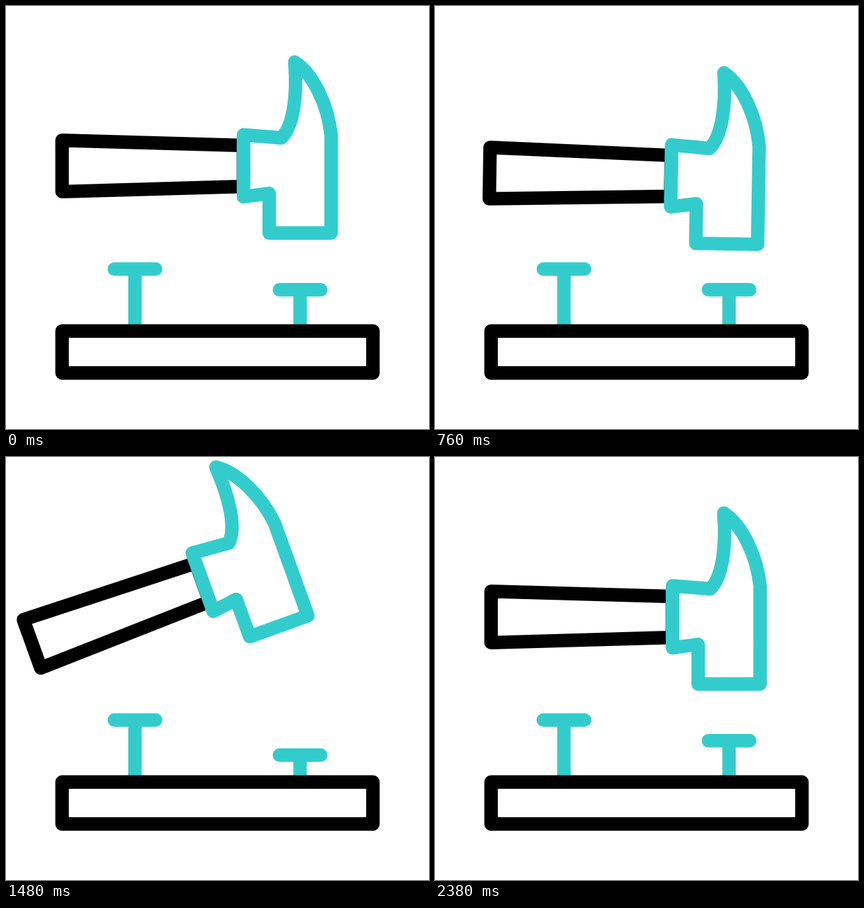
Animation, 640 px wide and 640 px high, one loop 2400 ms. Source, as an HTML page with a canvas:

```html
<!DOCTYPE html>
<html lang="en">
<head>
<meta charset="utf-8">
<title>Hammer and nails</title>
<style>
  html, body { margin: 0; width: 100%; height: 100%; overflow: hidden; background: #fff; }
  canvas { display: block; width: 640px; height: 640px; }
</style>
</head>
<body>
<canvas id="stage" width="640" height="640"></canvas>
<script>
const ctx = document.getElementById('stage').getContext('2d');
const LOOP = 2400;
const STEP = 20;
const TEAL = '#33cccc';
const BLACK = '#000';

// Hammer poses; x and y place the pivot.
const REST = { angle: 0, x: 185, y: 222 };
const RAISED = { angle: -20.9, x: 123.9, y: 229.6 };
const FIRST_HIT = { angle: 16.5, x: 225.7, y: 237.7 };
const SECOND_HIT = { angle: 16.5, x: 228.6, y: 236.4 };

const NAIL_TOP = 429.2;
const NAIL_DROP = 21.8;

// Eased progress from 0 to 1 between two times.
function progress(time, start, end) {
  const t = Math.min(1, Math.max(0, (time - start) / (end - start)));
  return t * t * (3 - 2 * t);
}

function hammerAt(time) {
  const pose = { ...REST };
  const swing = (from, to, start, end) => {
    const k = progress(time, start, end);
    for (const key in pose) pose[key] += (to[key] - from[key]) * k;
  };
  swing(REST, RAISED, 0, 500);
  swing(RAISED, FIRST_HIT, 500, 968);
  swing(FIRST_HIT, RAISED, 1002, 1433);
  swing(RAISED, SECOND_HIT, 1433, 1896);
  swing(SECOND_HIT, REST, 1928, 2232);
  return pose;
}

function nailAt(time) {
  const depth = progress(time, 940, 1050) + progress(time, 1920, 2055)
    - 2 * progress(time, 2160, 2380);
  return NAIL_TOP + NAIL_DROP * depth;
}

function stroke(color, path) {
  ctx.strokeStyle = color;
  ctx.beginPath();
  path();
  ctx.stroke();
}

function lines(...points) {
  points.forEach(([x, y]) => ctx.lineTo(x, y));
}

function drawNail(x, y) {
  stroke(TEAL, () => {
    lines([x - 31.2, y], [x + 31.2, y]);
    ctx.moveTo(x, y);
    ctx.lineTo(x, 488);
  });
}

function drawBoard() {
  stroke(BLACK, () => ctx.rect(84.8, 491.8, 470.4, 63.4));
}

function handle() {
  lines([84.8, 203.2], [84.8, 280.9], [359, 273], [359, 211]);
  ctx.closePath();
}

function head() {
  ctx.moveTo(436.9, 84.8);
  ctx.bezierCurveTo(441, 135, 435, 182, 416.5, 199.5);
  lines([359.3, 195], [359.3, 288.7], [398.2, 283.5], [398.2, 343.5], [491.8, 343.5], [491.8, 195]);
  ctx.bezierCurveTo(487, 150, 465, 103, 436.9, 84.8);
  ctx.closePath();
}

function drawHammer({ angle, x, y }) {
  ctx.save();
  ctx.translate(x, y);
  ctx.rotate(angle * Math.PI / 180);
  ctx.translate(-REST.x, -REST.y);
  stroke(BLACK, handle);
  stroke(TEAL, head);
  ctx.restore();
}

function render() {
  const time = Math.floor((performance.now() % LOOP) / STEP) * STEP;
  ctx.fillStyle = '#fff';
  ctx.fillRect(0, 0, 640, 640);
  ctx.lineWidth = 20.4;
  ctx.lineCap = ctx.lineJoin = 'round';
  drawNail(195.1, 398);
  drawNail(444.9, nailAt(time));
  drawBoard();
  drawHammer(hammerAt(time));
  requestAnimationFrame(render);
}

render();
</script>
</body>
</html>
```
